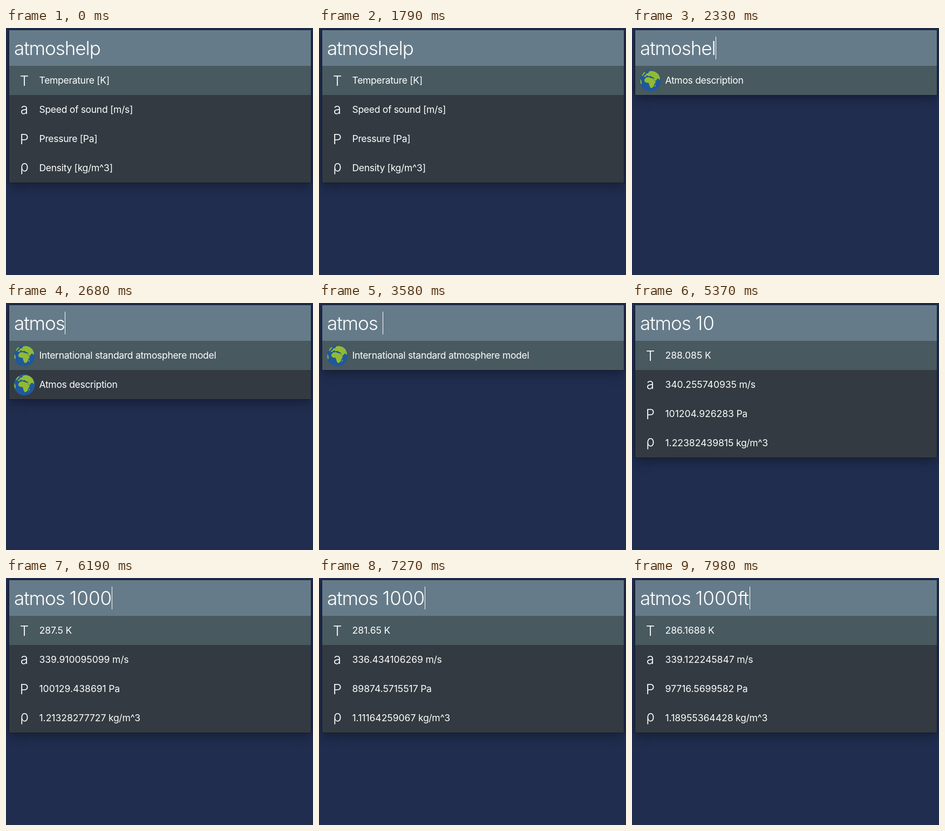
Write an HTML page with a canvas that moves like this. It is 569 by 457 pixels and loops after 8 s.

```html
<!DOCTYPE html>
<html lang="en">
<head>
<meta charset="utf-8">
<title>Atmosphere launcher</title>
<style>
html, body { margin: 0; width: 100%; height: 100%; overflow: hidden; background: #202d4f; }
canvas, svg { position: absolute; left: 0; top: 0; }
text {
  font-family: Inter, Roboto, sans-serif;
  font-optical-sizing: none;
  fill: #fff;
  white-space: pre;
}
.query { font-size: 35px; font-weight: 340; letter-spacing: -1.05px; }
.label { font-size: 17.5px; font-weight: 400; letter-spacing: -0.3px; }
.symbol { font-size: 26px; font-weight: 300; text-anchor: middle; }
.digits { letter-spacing: 0; }
</style>
</head>
<body>
<canvas id="shapes" width="569" height="457"></canvas>
<svg id="words" width="569" height="457" viewBox="0 0 569 457"></svg>
<script>
const LOOP = 8000;
const PANEL = { x: 6, y: 4, w: 559, bar: 66, row: 54 };
const SYMBOLS = [['T', 106.5], ['a', 158.5], ['P', 214.5], ['ρ', 264.5]];
const ctx = document.getElementById('shapes').getContext('2d');
const svg = document.getElementById('words');

// Standard atmosphere in the troposphere, height in metres
function atmosphere(height) {
  const R = 287.0531, lapse = 0.0065, T0 = 288.15;
  const T = T0 - lapse * height;
  const power = 9.80665 / (lapse * R);
  const show = (value, unit) => Number(value.toPrecision(12)) + ' ' + unit;
  return [
    show(T, 'K'),
    show(Math.sqrt(1.4 * R * T), 'm/s'),
    show(101325 * (T / T0) ** power, 'Pa'),
    show(1.225 * (T / T0) ** (power - 1), 'kg/m^3')
  ];
}

const list = (rows, icon) => ({ rows, icon });
const values = height => list(atmosphere(height), 'symbol');
const ABOUT = 'Atmos description';
const MODEL = 'International standard atmosphere model';

const help = list(['Temperature [K]', 'Speed of sound [m/s]', 'Pressure [Pa]', 'Density [kg/m^3]'], 'symbol');
const about = list([ABOUT], 'globe');
const both = list([MODEL, ABOUT], 'globe');
const model = list([MODEL], 'globe');
const bare = list(atmosphere(1), 'none');
const one = values(1), ten = values(10), hundred = values(100);
const thousand = values(1000), feet = values(304.8);

// start time, query, caret column (0 = hidden), result list
const STEPS = [
  [0, 'atmoshelp', 0, help],
  [120, 'atmoshelp', 175, help],
  [660, 'atmoshelp', 0, help],
  [1250, 'atmoshelp', 175, help],
  [1790, 'atmoshelp', 0, help],
  [2330, 'atmoshel', 155, about],
  [2440, 'atmoshe', 147, about],
  [2560, 'atmosh', 128, about],
  [2680, 'atmos', 109, both],
  [3280, 'atmos', 0, both],
  [3580, 'atmos ', 118, model],
  [4120, 'atmos ', 0, model],
  [4180, 'atmos 1', 133, model],
  [4350, 'atmos 1', 133, bare],
  [4410, 'atmos 1', 133, one],
  [4770, 'atmos 1', 0, one],
  [4830, 'atmos 10', 154, one],
  [4950, 'atmos 10', 154, ten],
  [5370, 'atmos 10', 0, ten],
  [5420, 'atmos 100', 175, ten],
  [5600, 'atmos 100', 175, hundred],
  [5960, 'atmos 100', 0, hundred],
  [6190, 'atmos 1000', 196, hundred],
  [6370, 'atmos 1000', 196, thousand],
  [6730, 'atmos 1000', 0, thousand],
  [7270, 'atmos 1000', 196, thousand],
  [7500, 'atmos 1000f', 207, thousand],
  [7680, 'atmos 1000f', 207, feet],
  [7980, 'atmos 1000ft', 218, feet]
];

function svgNode(tag, kind) {
  const node = document.createElementNS('http://www.w3.org/2000/svg', tag);
  node.setAttribute('class', kind);
  return node;
}

function addText(kind, x, y, content = '') {
  const node = svgNode('text', kind);
  node.setAttribute('x', x);
  node.setAttribute('y', y);
  node.textContent = content;
  svg.append(node);
  return node;
}

// Numbers are set looser than words
function setText(node, content) {
  node.replaceChildren(...content.split(/([\d.]+)/).map(part => {
    if (!/\d/.test(part)) return part;
    const span = svgNode('tspan', 'digits');
    span.textContent = part;
    return span;
  }));
}

const query = addText('query', 15, 50);
const labels = SYMBOLS.map((_, i) => addText('label', 61.5, 103 + i * PANEL.row));
const symbols = SYMBOLS.map(([sign, y]) => addText('symbol', 34, y, sign));

function box(color, x, y, w, h) {
  ctx.fillStyle = color;
  ctx.fillRect(x, y, w, h);
}

// Land outlines relative to the globe's centre
const LAND = [
  'M-11-2L-8-6L-3-6.5L1-5L5-4L8 1L10.5 1.5L7.5 6.5L6 10.5L3 13.5L0 13L-2 8L-3 4L-8 3.5L-11 1Z',
  'M-12-9L-9-10L-8-13L-4-14L-2-17.5L4-18L10-16L15-12L18-5L17-1L15-4L12-3L11 0L8-3L6-6L3-7L0-9L-3-8L-6-10L-9-7.5L-12-7Z',
  'M5-5L8-3L11-1L8 1Z',
  'M-16-9L-14-13L-11-16L-9-15L-12-12L-14-9Z',
  'M-18.5-3L-17-1L-16 3L-17 7L-18.5 4Z',
  'M8.5 8L10 7L9 11L7.8 11Z'
].map(d => new Path2D(d));

function drawGlobe(y) {
  ctx.save();
  ctx.translate(34, y);
  ctx.fillStyle = '#20589b';
  ctx.beginPath();
  ctx.arc(0, 0, 19.5, 0, Math.PI * 2);
  ctx.fill();
  ctx.fillStyle = '#92ba32';
  LAND.forEach(path => ctx.fill(path));
  ctx.restore();
}

function drawPanel(count) {
  const { x, y, w, bar, row } = PANEL;
  const h = bar + count * row;
  box('#202d4f', 0, 0, 569, 457);
  ctx.save();
  ctx.shadowColor = 'rgba(0,0,0,0.35)';
  ctx.shadowBlur = 20;
  ctx.shadowOffsetY = 6;
  box('#333a41', x, y, w, h);
  ctx.restore();
  ctx.strokeStyle = 'rgba(0,0,0,0.25)';
  ctx.lineWidth = 1;
  ctx.strokeRect(x - 0.5, y - 0.5, w + 1, h + 1);
  box('#667b89', x, y, w, bar);
  box('#48595f', x, y + bar, w, row);
}

let current;
function render(time) {
  const step = STEPS.filter(([start]) => start <= time).pop();
  if (step === current) return;
  current = step;
  const [, typed, caret, { rows, icon }] = step;
  drawPanel(rows.length);
  if (icon === 'globe') rows.forEach((_, i) => drawGlobe(97.5 + i * PANEL.row));
  if (caret) box('#fff', caret, 16, 1, 42);
  setText(query, typed);
  labels.forEach((label, i) => setText(label, rows[i] || ''));
  symbols.forEach(sign => { sign.style.display = icon === 'symbol' ? '' : 'none'; });
}

const begin = performance.now();
function tick() {
  render((performance.now() - begin) % LOOP);
  requestAnimationFrame(tick);
}
tick();
</script>
</body>
</html>
```
